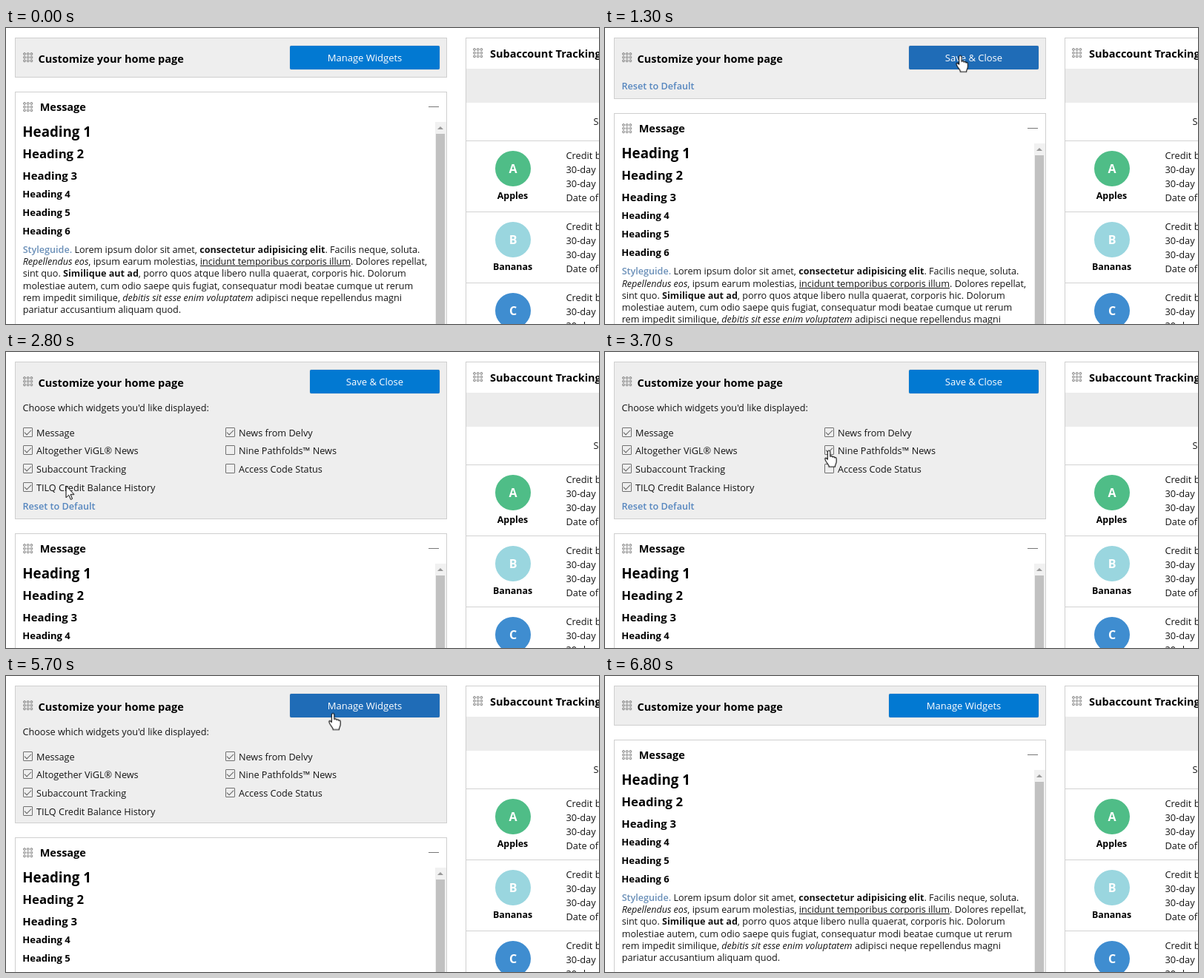
These frames come from a looping animation (800 px wide and 400 px high, 6900 ms). An HTML page:

```html
<!DOCTYPE html>
<html lang="en">
<head>
<meta charset="utf-8">
<title>Manage widgets</title>
<style>
  html, body { margin: 0; width: 100%; height: 100%; overflow: hidden; background: #fff; }
  body { position: relative; font: 12.65px "Open Sans", "Noto Sans", sans-serif; color: #141414; }

  /* --x and --y give the left edge and the middle of a line of text */
  p {
    position: absolute; margin: 0; line-height: 0; white-space: nowrap;
    left: calc(var(--x) * 1px); top: calc(var(--y) * 1px);
  }
  .title { font-size: 14.5px; font-weight: 700; color: #000; }
  .grip { position: absolute; width: 14px; height: 14px; }
  .edge { box-shadow: inset 0 0 0 1px #cfcfcf; }
  .defs { position: absolute; width: 0; height: 0; }

  #left { position: absolute; left: 12px; top: 13px; width: 583px; }
  #custom { position: relative; padding: 53px 0 1px; background: #eee; }
  #list { position: relative; overflow: hidden; animation: slide 6.9s infinite; }
  #reset { position: relative; overflow: hidden; animation: reset 6.9s step-end infinite; }
  #reset p { font-weight: 600; color: #5787bf; }

  .btn {
    position: absolute; right: 10px; top: 11px; height: 32px; border-radius: 2px;
    font-size: 13px; line-height: 33px; text-align: center; color: #fff;
    box-shadow: 0 0 1px rgba(0, 0, 0, .4);
  }
  #manage { width: 202px; animation: hover 6.9s step-end infinite, closed 6.9s step-end infinite; }
  #save { width: 175px; animation: hover 6.9s step-end infinite, open 6.9s step-end infinite; }

  .opt::before, .opt::after { content: ""; position: absolute; box-sizing: border-box; }
  .opt::before { left: -18px; top: -7px; width: 13px; height: 13px; border: 1px solid #707070; border-radius: 1px; }
  .opt::after {
    left: -16px; top: -4px; width: 9px; height: 5px;
    border: solid #606060; border-width: 0 0 1.2px 1.2px; transform: rotate(-45deg);
  }
  .off::after { display: none; }
  .on1::after { animation: check1 6.9s step-end infinite; }
  .on2::after { animation: check2 6.9s step-end infinite; }
  .on3::after { animation: check3 6.9s step-end infinite; }

  #message { position: relative; height: 420px; margin-top: 19px; background: #fff; }
  #message .head { font-weight: 700; color: #000; }
  #message .body { font-size: 12.6px; line-height: 16.2px; }
  .body a { font-weight: 600; color: #6a8fb8; }
  .minus { position: absolute; left: 558px; top: 20px; width: 14px; height: 1px; background: #777; }
  .bar { position: absolute; left: 567px; top: 41px; width: 15px; bottom: 1px; background: #f1f1f1; }
  .bar::before {
    content: ""; position: absolute; left: 3px; top: 6px;
    border: solid transparent; border-width: 0 4px 4px; border-bottom-color: #999;
  }
  .bar::after { content: ""; position: absolute; left: 1px; top: 16px; width: 12px; bottom: 0; background: #c1c1c1; }

  #side { position: absolute; left: 620px; top: 13px; width: 260px; height: 420px; }
  .band { position: absolute; left: 1px; top: 42px; right: 0; height: 46px; background: #ececec; }
  .row { position: absolute; left: 0; width: 100%; height: 96px; border-top: 1px solid #d2d2d2; }
  .dot {
    position: absolute; left: 40px; top: 13px; width: 48px; height: 48px; border-radius: 50%;
    font: 700 16px/48px "Open Sans", "Noto Sans", sans-serif; text-align: center; color: #fff;
  }
  .row .name { font-size: 12.4px; font-weight: 700; color: #000; transform: translateX(-50%); }
  .row .info { font-size: 12.8px; line-height: 19px; }

  #cursor {
    position: absolute; left: 0; top: 0; width: 1px; height: 1px; overflow: visible;
    animation: move 6.9s linear infinite, shown 6.9s step-end infinite;
  }
  #cursor path { fill: #fff; stroke: #000; stroke-linejoin: round; }
  #arrow { animation: arrow 6.9s step-end infinite; }
  #hand { animation: hand 6.9s step-end infinite; }

  @keyframes slide {
    0%, 18.4% { height: 0; animation-timing-function: ease-in-out; }
    23.1%, 82.7% { height: 132px; animation-timing-function: ease-in-out; }
    88.3%, 100% { height: 0; }
  }
  @keyframes reset { 0%, 82.5% { height: 0; } 18.8% { height: 27px; } }
  @keyframes closed { 0%, 82.5% { visibility: visible; } 18.8% { visibility: hidden; } }
  @keyframes open { 0%, 82.5% { visibility: hidden; } 18.8% { visibility: visible; } }
  @keyframes hover {
    0%, 20%, 92.6% { background: #0279d2; }
    8.6%, 77.4% { background: #1f6cb7; }
  }
  @keyframes check1 { 0% { opacity: 0; } 34.7%, 100% { opacity: 1; } }
  @keyframes check2 { 0% { opacity: 0; } 53.6%, 100% { opacity: 1; } }
  @keyframes check3 { 0% { opacity: 0; } 66.6%, 100% { opacity: 1; } }

  @keyframes move {
    0%, 1.4% { transform: translate(505px, 366px); animation-timing-function: ease-out; }
    10.1% { transform: translate(484px, 41px); }
    11.5%, 18.7% { transform: translate(487px, 36px); }
    23.19% { transform: translate(265px, 72px); }
    28.9% { transform: translate(120px, 158px); animation-timing-function: ease-out; }
    34.7%, 39.1% { transform: translate(29px, 184px); }
    40.58% { transform: translate(80px, 181px); animation-timing-function: ease-out; }
    46.3%, 53.6% { transform: translate(302px, 133px); }
    59.4%, 60.8% { transform: translate(302px, 157px); }
    63.7%, 71% { transform: translate(301.5px, 161px); animation-timing-function: ease-in-out; }
    79.7%, 91.3% { transform: translate(441px, 50.5px); animation-timing-function: ease-in; }
    97.1%, 100% { transform: translate(400px, 335px); }
  }
  @keyframes shown { 0%, 98.5% { visibility: hidden; } 1.4% { visibility: visible; } }
  @keyframes arrow {
    0%, 20%, 39.9%, 54.8%, 72%, 92.6% { opacity: 1; }
    8.6%, 34%, 45.5%, 58%, 77.4% { opacity: 0; }
  }
  @keyframes hand {
    0%, 20%, 39.9%, 54.8%, 72%, 92.6% { opacity: 0; }
    8.6%, 34%, 45.5%, 58%, 77.4% { opacity: 1; }
  }
</style>
</head>
<body>
<svg class="defs">
  <pattern id="dots" width="4.7" height="4.7" patternUnits="userSpaceOnUse">
    <circle cx="2" cy="2" r="1.4" fill="none" stroke="#666" stroke-width=".9"/>
  </pattern>
</svg>

<div id="left">
  <section id="custom" class="edge">
    <svg class="grip" style="left:11px;top:20px"><rect width="14" height="14" fill="url(#dots)"/></svg>
    <p class="title" style="--x:31.5;--y:29">Customize your home page</p>
    <div id="manage" class="btn" style="top:10.5px">Manage Widgets</div>
    <div id="save" class="btn" style="top:10.5px">Save &amp; Close</div>
    <div id="list">
      <p style="--x:10.5;--y:9">Choose which widgets you'd like displayed:</p>
      <p class="opt" style="--x:29;--y:42.5">Message</p>
      <p class="opt" style="--x:29;--y:67.3">Altogether ViGL® News</p>
      <p class="opt" style="--x:29;--y:92.1">Subaccount Tracking</p>
      <p class="opt on1" style="--x:29;--y:117">TILQ Credit Balance History</p>
      <p class="opt" style="--x:302;--y:42.5">News from Delvy</p>
      <p class="opt on2" style="--x:302;--y:67.3">Nine Pathfolds™ News</p>
      <p class="opt on3" style="--x:302;--y:92.1">Access Code Status</p>
    </div>
    <div id="reset"><p style="--x:10.5;--y:10">Reset to Default</p></div>
  </section>

  <section id="message" class="edge">
    <svg class="grip" style="left:11px;top:14px"><rect width="14" height="14" fill="url(#dots)"/></svg>
    <p class="title" style="--x:33.7;--y:21">Message</p>
    <div class="minus"></div>
    <div class="bar"></div>
    <p class="head" style="--x:10.3;--y:54;font-size:18.7px">Heading 1</p>
    <p class="head" style="--x:10.3;--y:84;font-size:16.7px">Heading 2</p>
    <p class="head" style="--x:10.3;--y:113;font-size:14.9px">Heading 3</p>
    <p class="head" style="--x:10.3;--y:138;font-size:13px">Heading 4</p>
    <p class="head" style="--x:10.3;--y:163;font-size:13px">Heading 5</p>
    <p class="head" style="--x:10.3;--y:187.5;font-size:13px">Heading 6</p>
    <p class="body" style="--x:10.7;--y:206">
      <a>Styleguide.</a> Lorem ipsum dolor sit amet, <b>consectetur adipisicing elit</b>. Facilis neque, soluta.<br>
      <i>Repellendus eos</i>, ipsum earum molestias, <u>incidunt temporibus corporis illum</u>. Dolores repellat,<br>
      sint quo. <b>Similique aut ad</b>, porro quos atque libero nulla quaerat, corporis hic. Dolorum<br>
      molestiae autem, cum odio saepe quis fugiat, consequatur modi beatae cumque ut rerum<br>
      rem impedit similique, <i>debitis sit esse enim voluptatem</i> adipisci neque repellendus magni<br>
      pariatur accusantium aliquam quod.
    </p>
  </section>
</div>

<section id="side" class="edge">
  <svg class="grip" style="left:10px;top:14px"><rect width="14" height="14" fill="url(#dots)"/></svg>
  <p class="title" style="--x:33;--y:22">Subaccount Tracking</p>
  <div class="band"></div>
  <p style="--x:172.5;--y:113">S</p>
  <div class="row" style="top:139px">
    <div class="dot" style="background:#4fbd87">A</div>
    <p class="name" style="--x:63.5;--y:73.5">Apples</p>
    <p class="info" style="--x:135.5;--y:9.5">Credit b<br>30-day<br>30-day<br>Date of</p>
  </div>
  <div class="row" style="top:235px">
    <div class="dot" style="background:#9ad6df">B</div>
    <p class="name" style="--x:63.5;--y:73.5">Bananas</p>
    <p class="info" style="--x:135.5;--y:9.5">Credit b<br>30-day<br>30-day<br>Date of</p>
  </div>
  <div class="row" style="top:331px">
    <div class="dot" style="background:#3f8dd0">C</div>
    <p class="info" style="--x:135.5;--y:9.5">Credit b<br>30-day<br>30-day<br>Date of</p>
  </div>
</section>

<svg id="cursor">
  <path id="arrow" d="M0 0V16L3.7 12.5 6.3 18.5 8.6 17.5 6 11.7H11Z"/>
  <g id="hand">
    <path transform="scale(.88 1)" stroke-width="1.2" d="M-2 2a2 2 0 0 1 4 0V8c1-1 3.5-.8 3.5.8c1-1 3.3-.6 3.3.9c1.2-.8 2.7-.2 2.7 1.4V15c0 3-2 4-2 6.5V22H0V21c0-2-5.5-6-6-9.5c0-1.8 2-2 4 .5Z"/>
  </g>
</svg>
</body>
</html>
```
